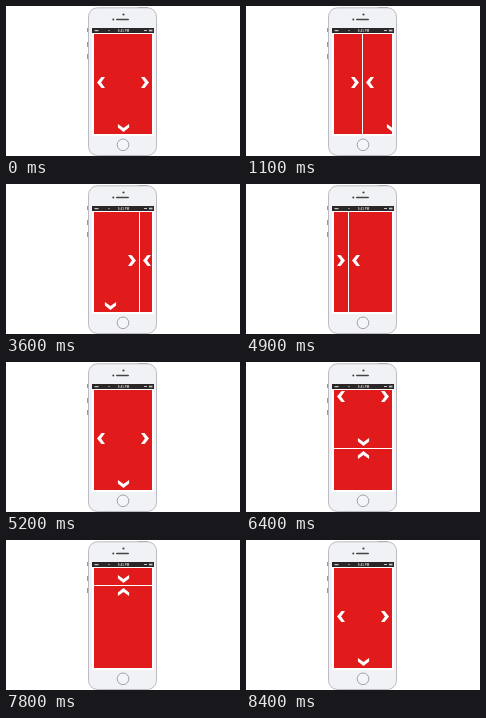
These frames come from a looping animation (234x150 px, 9400 ms). An HTML page:

```html
<!DOCTYPE html>
<html lang="en">
<head>
<meta charset="utf-8">
<title>Swipe directions</title>
<style>
  html, body { margin: 0; width: 100%; height: 100%; overflow: hidden; background: #fff; }
  svg { display: block; width: 100%; height: 100%; }
  .status { font: 700 3px "Liberation Sans", Arial, sans-serif; fill: #d0d0d0; }
</style>
</head>
<body>
<svg viewBox="0 0 234 150">
  <defs>
    <clipPath id="screen"><rect x="88" y="28" width="58" height="100"/></clipPath>
    <path id="chevron" d="M.5-5.6H4L.1 0 4 5.6H.5L-4 0Z" fill="#fff"/>
    <rect id="page" x="88" y="28" width="58" height="100" fill="#e11b1c"/>
  </defs>

  <g fill="#999">
    <rect x="132" y="1" width="10" height="1"/>
    <rect x="81" y="22" width="1.5" height="4"/>
    <rect x="81" y="36" width="1.5" height="5"/>
    <rect x="81" y="48" width="1.5" height="5"/>
  </g>
  <rect x="82.5" y="1.8" width="68" height="147.7" rx="9" fill="#f1f2f6" stroke="#adadb2" stroke-width=".8"/>
  <circle cx="117.5" cy="8.5" r="1.1" fill="#444"/>
  <circle cx="107.3" cy="13.5" r="1" fill="#444"/>
  <rect x="110" y="12.7" width="13" height="1.6" rx=".8" fill="#444"/>
  <circle cx="117" cy="138.8" r="5.8" fill="#f4f5f8" stroke="#9a9a9e" stroke-width=".9"/>

  <rect x="86" y="22" width="62" height="108" fill="#fff"/>
  <rect x="86" y="22" width="62" height="5" fill="#2b2728"/>
  <g fill="#c4c4c4">
    <rect x="88.5" y="24" width="4" height="1.2"/>
    <circle cx="103" cy="24.6" r=".7"/>
    <rect x="138" y="24" width="3" height="1"/>
    <rect x="143" y="23.7" width="3.5" height="1.7"/>
  </g>
  <text class="status" x="117.5" y="25.7" text-anchor="middle">9:41 PM</text>

  <g clip-path="url(#screen)">
    <rect x="88" y="28" width="58" height="100" fill="#fff"/>
    <g id="pages">
      <g>
        <use href="#page"/>
        <use href="#chevron" transform="translate(95 76.5)"/>
        <use href="#chevron" transform="translate(139 76.5) rotate(180)"/>
        <use href="#chevron" transform="translate(117.5 122) rotate(-90)"/>
      </g>
      <g transform="translate(-59)">
        <use href="#page"/>
        <use href="#chevron" transform="translate(139 76.5) rotate(180)"/>
      </g>
      <g transform="translate(59)">
        <use href="#page"/>
        <use href="#chevron" transform="translate(95 76.5)"/>
      </g>
      <g transform="translate(0 101)">
        <use href="#page"/>
        <use href="#chevron" transform="translate(117.5 34) rotate(90)"/>
      </g>
    </g>
  </g>
</svg>
<script>
  const LOOP = 9400, STEP = 100;

  // Each swipe: start time, axis, page offset after each step
  const swipes = [
    [1000, 'x', [14, 29, 44, 59]],
    [2300, 'x', [48, 32, 16, 0]],
    [3600, 'x', [-13, -28, -43, -59]],
    [4900, 'x', [-44, -29, -15, 0]],
    [6200, 'y', [-14, -28, -42, -57, -72, -87, -101]],
    [7800, 'y', [-83, -69, -55, -41, -27, -13, 0]]
  ];

  const pose = (time, axis, shift) => ({
    offset: time / LOOP,
    transform: axis === 'x' ? `translate(${shift}px, 0px)` : `translate(0px, ${shift}px)`,
    easing: 'step-end'
  });

  const frames = [
    pose(0, 'x', 0),
    ...swipes.flatMap(([start, axis, shifts]) =>
      shifts.map((shift, i) => pose(start + i * STEP, axis, shift))),
    pose(LOOP, 'x', 0)
  ];

  document.getElementById('pages').animate(frames, { duration: LOOP, iterations: Infinity });
</script>
</body>
</html>
```
